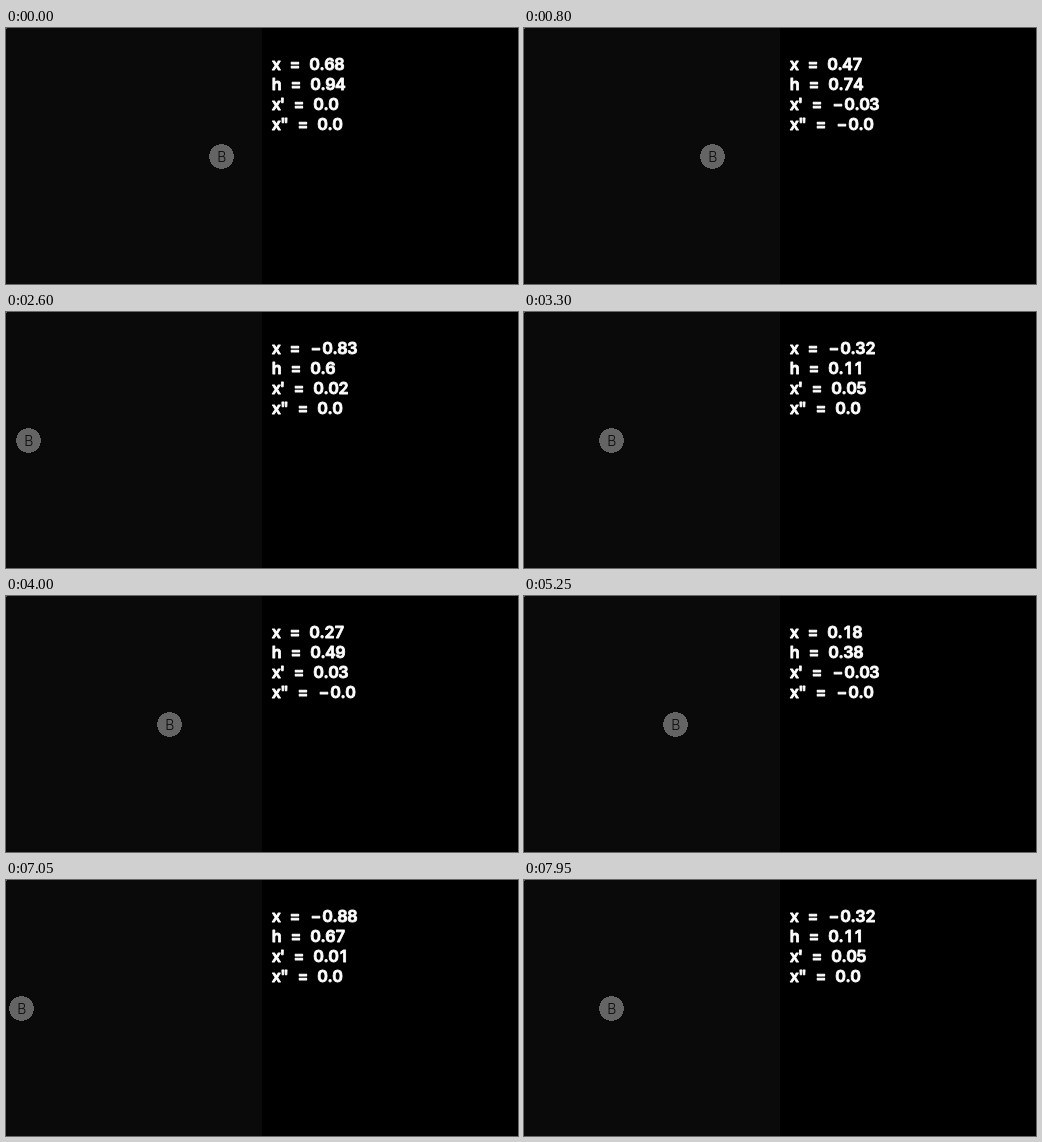
An HTML page that plays this animation: 512 by 256 pixels, repeating every 8 s.

```html
<!DOCTYPE html>
<html lang="en">
<head>
<meta charset="utf-8">
<title>Ball in a valley</title>
<style>
  html, body { margin: 0; width: 100%; height: 100%; overflow: hidden; background: #000; }
  svg { display: block; width: 512px; height: 256px; }
  text { font-family: Inter, "DejaVu Sans", sans-serif; text-anchor: middle; }
  .row { font-size: 16.2px; font-weight: 600; fill: #fff; stroke: #fff; stroke-width: 0.8px; stroke-linejoin: round; }
  .tag { font-size: 14px; font-weight: 300; fill: #0a0a0a; }
</style>
</head>
<body>
<svg viewBox="0 0 512 256">
  <rect width="512" height="256" fill="#000"/>
  <rect width="256" height="256" fill="#0a0a0a"/>
  <rect width="1" height="1" fill="#646464"/>
  <g id="ball">
    <circle r="12.3" fill="#646464" shape-rendering="crispEdges"/>
    <text class="tag" x="0.4" y="5.5">B</text>
  </g>
  <g id="rows"></g>
</svg>
<script>
const STEP = 50, COUNT = 160;
const SCALE = 2.85, VALLEY = -0.2355;   // phase = SCALE * (x - VALLEY)
const START = 2.601, WALL = -1.8875, GRAVITY = 0.0025;

// Ball rolling in a cosine valley; the left wall stops it dead.
function simulate() {
  const states = [];
  let phase = START, v = 0, a = 0;
  for (let i = 0; i < COUNT; i++) {
    states.push({ x: VALLEY + phase / SCALE, h: 0.55 - 0.45 * Math.cos(phase), v, a });
    a = -GRAVITY * Math.sin(phase);
    v += a;
    phase += 3 * v;
    if (phase < WALL) { phase = WALL; v = 0; }
  }
  return states;
}

// Two decimals at most, at least one, and a signed zero.
function format(n) {
  const size = Math.round(Math.abs(n) * 100) / 100;
  return (n < 0 ? "\u2212" : "") + (Number.isInteger(size) ? size + ".0" : size);
}

const ADVANCE = { x: 8.5, h: 9.5, "'": 4, '"': 8, " ": 8, "=": 13, "\u2212": 13, ".": 5 };

// Centres each glyph in its cell of the plotter-style spacing.
function setLine(el, line) {
  let pen = 266;
  const xs = [];
  for (const ch of line) {
    const width = ADVANCE[ch] || 10;
    if (ch !== " ") xs.push(pen + width / 2);
    pen += width;
  }
  el.setAttribute("x", xs.join(" "));
  el.textContent = line.replace(/ /g, "");
}

const ball = document.getElementById("ball");
const rows = [0, 1, 2, 3].map(i => {
  const el = document.createElementNS("http://www.w3.org/2000/svg", "text");
  el.setAttribute("class", "row");
  el.setAttribute("y", 41.5 + 20 * i);
  return document.getElementById("rows").appendChild(el);
});
const states = simulate();
let shown = -1;

function draw(time) {
  const i = Math.floor(time / STEP) % COUNT;
  if (i === shown) return;
  shown = i;
  const { x, h, v, a } = states[i];
  ball.setAttribute("transform", `translate(${Math.round(128 + 128 * x) + 0.5} 128.5)`);
  [["x", x], ["h", h], ["x'", v], ['x"', a]].forEach(([name, value], k) =>
    setLine(rows[k], `${name} = ${format(value)}`));
}

const begin = performance.now();
function tick() {
  draw(performance.now() - begin);
  requestAnimationFrame(tick);
}
tick();
</script>
</body>
</html>
```
